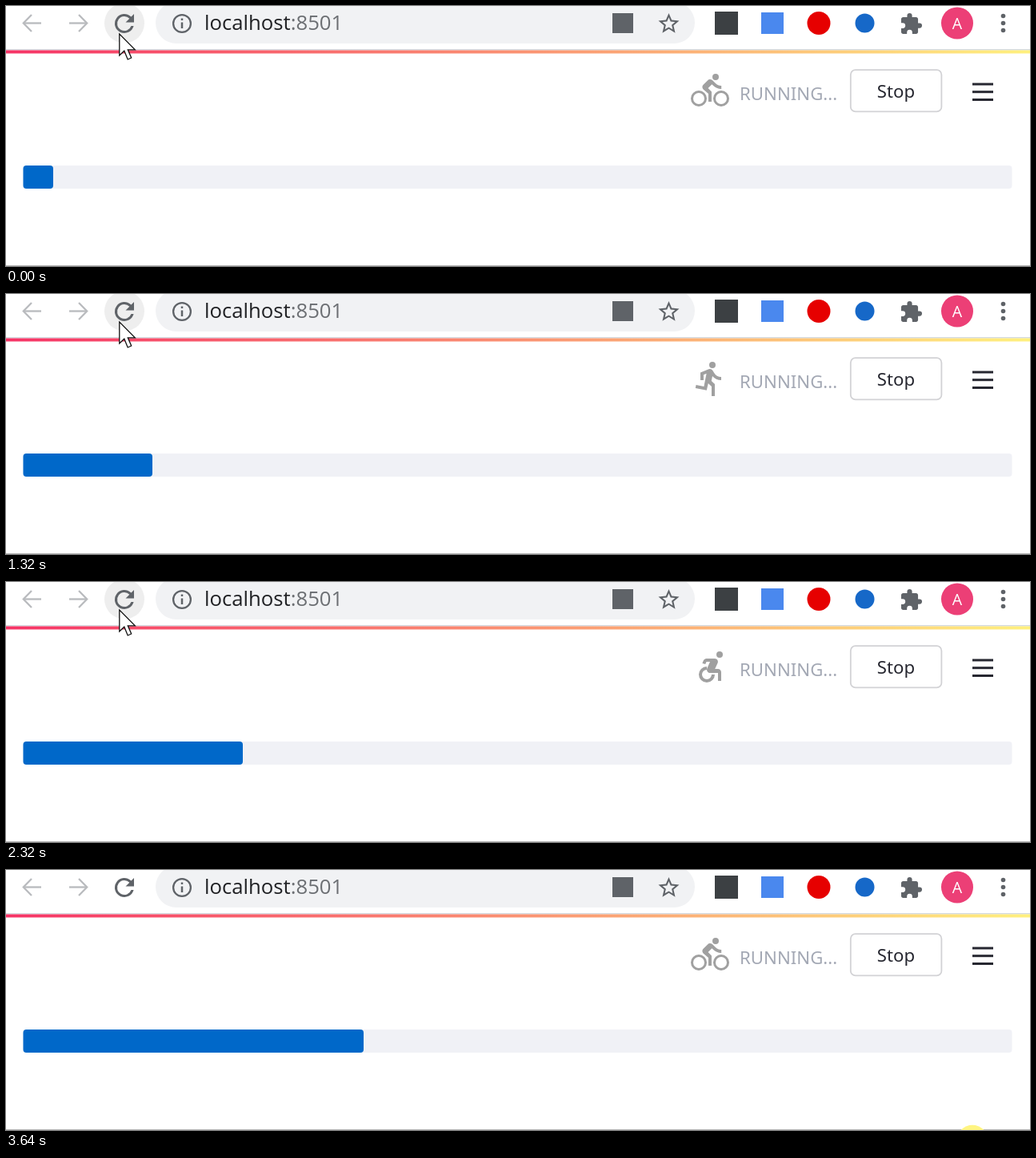
An HTML page with a canvas that plays this animation: 1280 by 326 pixels, repeating every 3.74 s.

```html
<!DOCTYPE html>
<html lang="en">
<head>
<meta charset="utf-8">
<title>Progress</title>
<style>
html, body { margin: 0; width: 100%; height: 100%; overflow: hidden; background: #fff; }
canvas { display: block; width: 1280px; height: 326px; }
</style>
</head>
<body>
<canvas id="stage" width="1280" height="326"></canvas>
<script>
const ctx = document.getElementById('stage').getContext('2d');
const LOOP = 3740;
const GREY = '#5f6368', INK = '#262730';
const SANS = '"Open Sans", "Noto Sans", sans-serif';
const UI = '"Noto Sans", "Open Sans", sans-serif';

// 24-unit glyphs
const head = (x, y, r) => `M${x - r} ${y}a${r} ${r} 0 1 0 ${2 * r} 0a${r} ${r} 0 1 0 ${-2 * r} 0z`;
const wheel = x => head(x, 17, 5) + head(x, 17, 3.5);
const glyph = d => new Path2D(d);

const ICONS = {
  bike: glyph(head(15.5, 3.5, 2) + wheel(5) + wheel(19) +
    'M10.8 10.5l2.4-2.4.8.8c1.3 1.3 3 2.1 5.1 2.1V9c-1.5 0-2.7-.6-3.6-1.5l-1.9-1.9c-.5-.4-1-.6-1.6-.6s-1.1.2-1.4.6L7.8 8.4c-.4.4-.6.9-.6 1.4 0 .6.2 1.1.6 1.4L11 14v5h2v-6.2z'),
  run: glyph(head(13.5, 3.5, 2) +
    'M9.9 19.4l1-4.4 2.1 2v6h2v-7.5l-2.1-2 .6-3c1.3 1.5 3.3 2.5 5.5 2.5v-2c-1.9 0-3.5-1-4.3-2.4l-1-1.6c-.4-.6-1-1-1.7-1-.3 0-.5.1-.8.1L6 8.3V13h2V9.6l1.8-.7-1.6 8.1-4.9-1-.4 2z'),
  walk: glyph(head(13.5, 3.5, 2) +
    'M9.8 8.9L7 23h2.1l1.8-8 2.1 2v6h2v-7.5l-2.1-2 .6-3c1.3 1.5 3.3 2.5 5.5 2.5v-2c-1.9 0-3.5-1-4.3-2.4l-1-1.6c-.4-.6-1-1-1.7-1-.3 0-.5.1-.8.1L6 8.3V13h2V9.6z'),
  stand: glyph(head(12, 4, 2) +
    'M20.5 6c-2.6.7-5.7 1-8.5 1s-5.9-.3-8.5-1L3 8c1.9.5 4 .8 6 1v13h2v-6h2v6h2V9c2-.2 4.1-.5 6-1z'),
  swim: glyph(head(16.5, 5.5, 2.5) +
    'M8.7 12c.5 0 .8-.1 1.1-.4.5-.2 1.1-.6 2.2-.6s1.7.4 2.2.6c.3.3.6.4 1.1.4s.8-.1 1.2-.4l.4-.2L10.5 5C8.9 3.5 7.5 3 5 3v2.5c1.8 0 2.9.4 4 1.5l1 1-3.2 3.2.7.4c.4.3.6.4 1.2.4z'),
  chair: glyph(head(18, 4.5, 2) +
    'M15 17h-2a3 3 0 1 1-3-3v-2a5 5 0 1 0 5 5zM17 13.5h-1.9l1.7-3.7C17.4 8.5 16.4 7 15 7H9.8c-.8 0-1.5.5-1.9 1.2L7.2 10l1.9.5.7-1.5H12l-1.8 4.1c-.6 1.3.4 2.9 1.8 2.9h5v5h2v-5.5c0-1.1-.9-2-2-2z'),
};
const CYCLE = ['bike', 'run', 'walk', 'stand', 'swim', 'chair'];

const WAVE = glyph('M2 1c1.7 0 1.7-1 3.3-1S7 1 8.7 1 10.3 0 12 0s1.7 1 3.3 1 1.7-1 3.4-1S20.3 1 22 1');
const RELOAD = glyph('M17.65 6.35A8 8 0 1 0 19.73 14h-2.08A6 6 0 1 1 16.22 7.78L13 11h7V4z');
const STAR = glyph('M22 9.24l-7.19-.62L12 2 9.19 8.63 2 9.24l5.46 4.73L5.82 21 12 17.27 18.18 21l-1.63-7.03zM12 15.4l-3.76 2.27 1-4.28-3.32-2.88 4.38-.38L12 6.1l1.71 4.04 4.38.38-3.32 2.88 1 4.28z');
const PUZZLE = glyph('M20.5 11H19V7c0-1.1-.9-2-2-2h-4V3.5a2.5 2.5 0 0 0-5 0V5H4c-1.1 0-2 .9-2 2v3.8h1.5a2.7 2.7 0 0 1 0 5.4H2V20c0 1.1.9 2 2 2h3.8v-1.5a2.7 2.7 0 0 1 5.4 0V22H17c1.1 0 2-.9 2-2v-4h1.5a2.5 2.5 0 0 0 0-5z');
const ARROW = glyph('M.8 1v27l6-5.8L11.2 33l4.5-2L11.3 20.8h9z');
const IBEAM = glyph('M-7-13h5l2 1.5 2-1.5h5M0-12v25M-7 13.5h5l2-1.5 2 1.5h5');

// [step, x] of the bar's right edge
const BAR = [[0, 59], [4, 85], [6, 104], [9, 138], [12, 171], [16, 219], [18, 241], [23, 296], [28, 357], [36, 447]];
// [step, x, y] of the pointer
const POINTER = [[0, 141, 34], [26, 141, 34], [27, 200, 38], [28, 369, 42], [29, 720, 140], [30, 1056, 277], [31, 1180, 340], [36, 1208, 340]];

function sample(keys, n, axis = 1) {
  const i = Math.max(1, keys.findIndex(k => k[0] >= n));
  const a = keys[i - 1], b = keys[i];
  return a[axis] + (b[axis] - a[axis]) * (n - a[0]) / (b[0] - a[0]);
}

// 100 ms steps, two of them 20 ms longer
function stepAt(t) {
  if (t < 920) return Math.min(8, Math.floor(t / 100));
  if (t < 2840) return Math.min(27, Math.floor((t - 20) / 100));
  return Math.min(36, Math.floor((t - 40) / 100));
}

function disc(x, y, r, color) {
  ctx.fillStyle = color;
  ctx.beginPath();
  ctx.arc(x, y, r, 0, Math.PI * 2);
  ctx.fill();
}

function box(x, y, w, h, r, color) {
  ctx.fillStyle = color;
  ctx.beginPath();
  ctx.roundRect(x, y, w, h, r);
  ctx.fill();
}

function line(color, width, ...pts) {
  ctx.strokeStyle = color;
  ctx.lineWidth = width;
  ctx.beginPath();
  for (let i = 0; i < pts.length; i += 2) ctx.lineTo(pts[i], pts[i + 1]);
  ctx.stroke();
}

function at(x, y, scale, draw) {
  ctx.save();
  ctx.translate(x, y);
  ctx.scale(scale, scale);
  draw();
  ctx.restore();
}

function icon(path, x, y, scale, color) {
  ctx.fillStyle = color;
  at(x, y, scale, () => ctx.fill(path, 'evenodd'));
}

function text(str, x, y, font, color, align = 'left') {
  ctx.font = font;
  ctx.fillStyle = color;
  ctx.textAlign = align;
  ctx.fillText(str, x, y);
  return ctx.measureText(str).width;
}

function drawToolbar(hover) {
  const pale = '#b9bbbe';
  line(pale, 2.3, 44, 21.5, 22, 21.5);
  line(pale, 2.3, 32, 11, 21.8, 21.5, 32, 32);
  line(pale, 2.3, 79, 21.5, 101, 21.5);
  line(pale, 2.3, 91, 11, 101.2, 21.5, 91, 32);

  ctx.globalAlpha = hover;
  disc(148, 21.5, 25, '#eeeeee');
  ctx.globalAlpha = 1;
  icon(RELOAD, 130, 4, 1.5, GREY);

  box(187, -5, 674, 52, 26, '#f1f2f4');
  ctx.strokeStyle = GREY;
  ctx.lineWidth = 2.3;
  ctx.beginPath();
  ctx.arc(220, 22, 10.9, 0, Math.PI * 2);
  ctx.stroke();
  line(GREY, 2.5, 220, 20.5, 220, 28);
  line(GREY, 2.5, 220, 15.5, 220, 18);

  const font = '25.7px ' + SANS;
  const w = text('localhost', 248, 30, font, '#202124');
  text(':8501', 248 + w, 30, font, '#6c6f73');

  box(758, 9, 26, 25, 0, GREY);
  icon(STAR, 812.9, 6.4, 1.3, GREY);
  box(886, 7, 29, 29, 0, '#3c4043');
  box(944, 8, 28, 27, 0, '#4a88ee');
  disc(1016, 21.5, 14.5, '#e60000');
  disc(1073.5, 21.5, 12, '#1668c8');
  icon(PUZZLE, 1116.5, 7.8, 1.24, GREY);
  disc(1189, 21.5, 20, '#ec3f76');
  text('A', 1189, 28.5, '19.5px ' + SANS, '#fff', 'center');
  for (let i = -1; i < 2; i++) disc(1246.5, 21.5 + 9 * i, 2.8, GREY);

  box(0, 54, 1280, 1.6, 0, '#d3dae0');
  const strip = ctx.createLinearGradient(0, 0, 1280, 0);
  strip.addColorStop(0, '#f63366');
  strip.addColorStop(1, '#fff07e');
  box(0, 55.6, 1280, 4, 0, strip);
}

function drawStatus(name) {
  const grey = '#a0a0a0';
  icon(ICONS[name], 856, 82, 2, grey);
  if (name === 'swim') {
    ctx.strokeStyle = grey;
    ctx.lineWidth = 2;
    for (const y of [14.5, 19]) at(856, 82 + 2 * y, 2, () => ctx.stroke(WAVE));
  }
  text('RUNNING...', 917, 118, '22.2px ' + UI, '#a3a8b4');
  ctx.strokeStyle = '#d2d2d5';
  ctx.lineWidth = 1.8;
  ctx.beginPath();
  ctx.roundRect(1055.8, 80.2, 113.6, 52.2, 6);
  ctx.stroke();
  text('Stop', 1112.5, 115, '22.2px ' + UI, INK, 'center');
  for (const y of [98, 107.7, 117.5]) line(INK, 3, 1208, y, 1234, y);
}

function drawPointer(n) {
  const x = sample(POINTER, n, 1), y = sample(POINTER, n, 2);
  if (n === 36) disc(1208, 339, 19.3, '#fff582');
  if (x > 187 && y < 47) {
    ctx.strokeStyle = '#000';
    ctx.lineWidth = 2.4;
    at(x, y, 1, () => ctx.stroke(IBEAM));
  } else {
    ctx.strokeStyle = '#111';
    ctx.lineWidth = 1.3;
    icon(ARROW, x, y, 1, '#fff');
    at(x, y, 1, () => ctx.stroke(ARROW));
  }
}

function render(t) {
  const n = stepAt(t);
  box(0, 0, 1280, 326, 0, '#fff');
  drawToolbar(Math.min(1, Math.max(0, (33 - n) / 4)));
  drawStatus(CYCLE[n % CYCLE.length]);
  box(21.5, 200, 1236, 29, 4, '#f0f1f6');
  box(21.5, 200, sample(BAR, n) - 21.5, 29, 4, '#0068c9');
  box(0, 325, 1280, 1, 0, '#b8b8b8');
  drawPointer(n);
}

const start = performance.now();
function tick() {
  render((performance.now() - start) % LOOP);
  requestAnimationFrame(tick);
}
tick();
</script>
</body>
</html>
```
